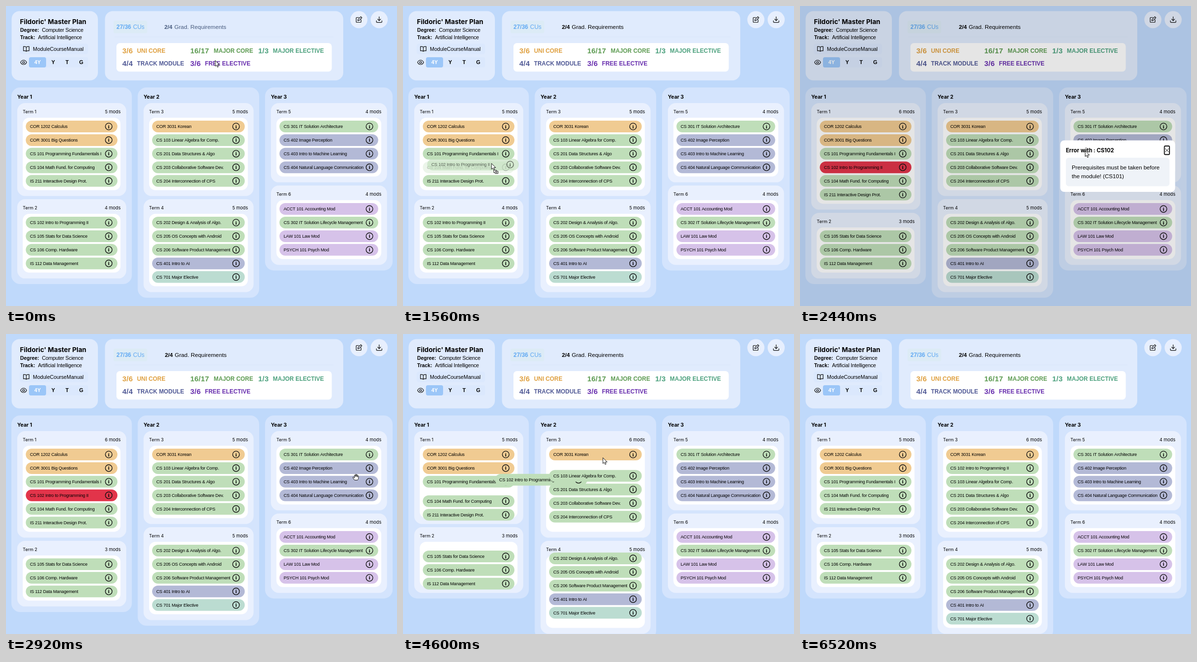
An HTML page with a canvas that plays this animation: 800x615 px, repeating every 6.56 s.

```html
<!DOCTYPE html>
<html lang="en">
<head>
<meta charset="utf-8">
<title>Study planner</title>
<style>
html, body { margin: 0; width: 100%; height: 100%; overflow: hidden; background: #bfd9fb; }
canvas { display: block; }
</style>
</head>
<body>
<canvas id="stage" width="800" height="615"></canvas>
<script>
const g = document.getElementById('stage').getContext('2d');
const LOOP = 6560, SLIDE = 250, PITCH = 27.9;
const DROP1 = 1910, CLOSE = 2820, DROP2 = 4464;
const SANS = '"Liberation Sans", Arial, sans-serif';
const ROUND = 'Inter, sans-serif';
const MOVED = 'CS 102 Intro to Programming II';

const years = [[11, 257.5], [269.5, 518], [530, 791]];
const start = [
  ['COR 1202 Calculus', 'COR 3001 Big Questions', 'CS 101 Programming Fundamentals I',
   'CS 104 Math Fund. for Computing', 'IS 211 Interactive Design Prot.'],
  [MOVED, 'CS 105 Stats for Data Science', 'CS 106 Comp. Hardware', 'IS 112 Data Management'],
  ['COR 3031 Korean', 'CS 103 Linear Algebra for Comp.', 'CS 201 Data Structures & Algo',
   'CS 203 Collaborative Software Dev.', 'CS 204 Interconnection of CPS'],
  ['CS 202 Design & Analysis of Algo.', 'CS 205 OS Concepts with Android',
   'CS 206 Software Product Management', 'CS 401 Intro to AI', 'CS 701 Major Elective'],
  ['CS 301 IT Solution Architecture', 'CS 402 Image Perception',
   'CS 403 Intro to Machine Learning', 'CS 404 Natural Language Communication'],
  ['ACCT 101 Accounting Mod', 'CS 302 IT Solution Lifecycle Management',
   'LAW 101 Law Mod', 'PSYCH 101 Psych Mod']
];

function moveTo(term, index) {
  const lists = start.map(list => list.filter(name => name !== MOVED));
  lists[term].splice(index, 0, MOVED);
  return lists;
}

function layout(lists) {
  const terms = [], rows = new Map(), bottoms = [];
  years.forEach(([left, right], y) => {
    let top = 199;
    for (const i of [2 * y, 2 * y + 1]) {
      const height = 51 + PITCH * lists[i].length;
      terms.push({ i, left, right, top, height, count: lists[i].length });
      lists[i].forEach((name, k) => rows.set(name,
        { x: left + 29.5, y: top + 48 + PITCH * k, w: right - left - 59 }));
      top += height + 6.5;
    }
    bottoms.push(top + 5);
  });
  return { terms, rows, bottoms };
}
const states = [layout(start), layout(moveTo(0, 3)), layout(moveTo(2, 1))];

// time, x, y of the pointer
const path = [[0, 428, 112], [700, 172, 442], [950, 172, 442], [1520, 181, 323], [1600, 181, 323],
  [1800, 181, 312], [2120, 181, 312], [2620, 750, 291], [2840, 750, 291], [3400, 150, 330],
  [3560, 150, 330], [4080, 388, 290], [4360, 409, 254], [5200, 409, 254]];

const smooth = u => { u = Math.max(0, Math.min(1, u)); return u * u * (3 - 2 * u); };
const mix = (a, b, u) => a + (b - a) * u;

function pointer(t) {
  const k = path.findIndex(p => p[0] > t);
  if (k < 1) return null;
  const a = path[k - 1], b = path[k], u = smooth((t - a[0]) / (b[0] - a[0]));
  return { x: mix(a[1], b[1], u), y: mix(a[2], b[2], u) };
}

function box(x, y, w, h, r, fill, stroke, width = 1) {
  g.beginPath();
  g.roundRect(x, y, w, h, r);
  if (fill) { g.fillStyle = fill; g.fill(); }
  if (stroke) { g.strokeStyle = stroke; g.lineWidth = width; g.stroke(); }
}

// y is the middle of the capitals
function text(s, x, y, size, { color = '#000', weight = 400, font = SANS, align = 'left', gap = 0 } = {}) {
  g.font = `${weight} ${size}px ${font}`;
  g.letterSpacing = gap + 'px';
  g.textAlign = align;
  g.fillStyle = color;
  g.fillText(s, x, y + size * 0.36);
}

function shape(d, x, y, { scale = 1, fill, stroke = '#111', width = 1.2 } = {}) {
  const p = new Path2D(d);
  g.save();
  g.translate(x, y);
  g.scale(scale, scale);
  g.lineJoin = g.lineCap = 'round';
  if (fill) { g.fillStyle = fill; g.fill(p); }
  if (stroke) { g.strokeStyle = stroke; g.lineWidth = width; g.stroke(p); }
  g.restore();
}

function disc(x, y, r, fill, stroke, width) {
  g.beginPath();
  g.arc(x, y, r, 0, 7);
  if (fill) { g.fillStyle = fill; g.fill(); }
  if (stroke) { g.strokeStyle = stroke; g.lineWidth = width; g.stroke(); }
}

function rowColor(name) {
  if (name.startsWith('COR')) return '#f0cb92';
  if (name.startsWith('CS 4')) return '#b3b9d6';
  if (name.startsWith('CS 7')) return '#bbdcd1';
  return /^(CS|IS)/.test(name) ? '#bfdeb9' : '#d6c2e9';
}

function drawRow(name, { x, y, w }, red, alpha = 1) {
  g.globalAlpha = alpha;
  box(x, y - 12, w, 24, 12, red ? '#e2344a' : rowColor(name));
  text(name, x + 8.5, y, 9.1, { gap: -0.2 });
  const cx = x + w - 17.8;
  disc(cx, y, 6.9, null, '#111', 1.4);
  text('i', cx, y - 0.2, 10.5, { weight: 700, font: '"Liberation Serif", serif', align: 'center' });
  g.globalAlpha = 1;
}

function drawProfile() {
  box(11.5, 10.5, 176.5, 142, 16, '#e0ebfd');
  text("Fildoric' Master Plan", 28.5, 32, 13.6, { weight: 700, font: ROUND });
  text('Degree:', 29, 49.5, 10.4, { weight: 700 });
  text('Computer Science', 73.5, 49.5, 10.7, { gap: -0.2 });
  text('Track:', 29, 64.5, 10.4, { weight: 700 });
  text('Artificial Intelligence', 65.5, 64.5, 10.7, { gap: -0.2 });
  box(28, 77, 140, 22, 5, '#dbe8fd');
  text('ModuleCourseManual', 55, 88, 10.8, { gap: -0.1 });
  shape('M0-3.6C-1.5-5-4-5-5.8-4.8V3.8C-4 3.6-1.5 3.8 0 5C1.5 3.8 4 3.6 5.8 3.8V-4.8C4-5 1.5-5 0-3.6ZV5', 41.5, 88);
  shape('M-6.2 0C-3.5-6 3.5-6 6.2 0C3.5 6-3.5 6-6.2 0Z', 36, 115.5);
  disc(36, 115.5, 2, null, '#111', 1.2);
  box(47, 105, 121, 21, 4, '#dbe8fd');
  box(47, 105, 35, 21, 4, '#9bc6f8');
  [['4Y', 64.5, '#fff'], ['Y', 96.5], ['T', 125], ['G', 154]].forEach(([s, x, color]) =>
    text(s, x, 115.5, 10.8, { weight: 700, align: 'center', color }));
}

function drawSummary(t) {
  box(202.5, 10.5, 487.5, 142, 16, '#e0ebfd');
  box(220, 30, 69, 26, 4, '#dcebf6');
  text('27/36', 226, 42.5, 12, { weight: 700, color: '#62aaf3' });
  text('CUs', 260, 42.5, 12, { color: '#62aaf3' });
  const u = smooth(t / 240), ink = `rgb(${[70, 90, 125].map(c => Math.round(c * (1 - u)))})`;
  text('2/4', mix(324, 325, u), 42.5, 11.8, { weight: 700, color: ink });
  text('Grad. Requirements', mix(344.5, 345.2, u), 42.5, 11.8, { color: ink });
  box(222, 63, 448, 1, 0, '#dae6fa');
  box(226, 76, 440.5, 58.5, 7, '#fff');
  [['3/6', 'UNI CORE', 238, 268, 91.5, '#dfa040'],
   ['16/17', 'MAJOR CORE', 377, 425, 91.5, '#5d9b52'],
   ['1/3', 'MAJOR ELECTIVE', 516, 546, 91.5, '#4da17e'],
   ['4/4', 'TRACK MODULE', 238, 268, 118, '#515a96'],
   ['3/6', 'FREE ELECTIVE', 377, 407, 118, '#682fae']].forEach(([n, label, x1, x2, y, color]) => {
    text(n, x1, y, 15, { weight: 700, color, gap: 0.2 });
    text(label, x2, y, 11.9, { weight: 700, color });
  });
}

function drawButtons() {
  disc(722, 28, 17.5, '#e7effe');
  disc(763.5, 28, 17.5, '#e7effe');
  shape('M0-4.5H-4.5Q-5.5-4.5-5.5-3.5V4.5Q-5.5 5.5-4.5 5.5H3.5Q4.5 5.5 4.5 4.5V0M-2.2 2.2L-1.6-.6L4-6.1L6.1-4L.6 1.6Z', 722, 28);
  shape('M0-6V2M-3.2-1.2L0 2L3.2-1.2M-5.6 2V4.6Q-5.6 5.6-4.6 5.6H4.6Q5.6 5.6 5.6 4.6V2', 763.5, 28);
}

function drawBoard(view) {
  years.forEach(([left, right], i) => {
    box(left, 167, right - left, view.bottoms[i] - 167, 18, '#d4e4fd');
    text('Year ' + (i + 1), left + 12, 186, 10.5, { weight: 700, font: ROUND });
  });
  for (const { i, left, right, top, height, count } of view.terms) {
    box(left + 12, top, right - left - 23.5, height, 16, '#e9f0fe');
    text('Term ' + (i + 1), left + 23.3, top + 17.5, 9, { font: ROUND });
    text(count + ' mods', right - 23, top + 17.5, 9.2, { font: ROUND, align: 'right' });
    box(left + 23.3, top + 30, right - left - 46.5, height - 42, 13, '#fff');
  }
}

function drawModal() {
  g.fillStyle = 'rgba(0,0,0,.1)';
  g.fillRect(0, 0, 800, 615);
  box(532.5, 275.5, 235, 105.5, 8, '#fff');
  text('Error with : CS102', 544, 295.5, 11.3, { weight: 700, font: ROUND });
  box(745.5, 287, 10.5, 17.5, 2, '#fff', '#111', 1.8);
  shape('M-3.5-3.5L3.5 3.5M3.5-3.5L-3.5 3.5', 750.8, 295.8, { width: 1 });
  box(544, 311, 212, 58.5, 6, '#eff3f8');
  text('Prerequisites must be taken before', 556, 331, 11.6);
  text('the module! (CS101)', 556, 349, 11.6);
}

function drawCursor({ x, y }, kind) {
  if (kind === 'hand') {
    shape('M-3 6L-6 2Q-7 0-5.4-.2L-3 2V-3Q-2.6-5-1.2-3.4V-1V-5Q0-6.8 1-5V-1V-4.4Q2.2-6 3.2-4.2V0V-2.4Q4.6-3.6 5.2-2V2Q5 4.6 3.6 6Z',
      x, y, { fill: '#fff', width: 1 });
    return;
  }
  shape('M0 0V11.5L2.7 9.1L4.6 13.4L6.6 12.5L4.8 8.4H8.3Z', x, y, { fill: '#fff', width: 1 });
  if (kind === 'copy') {
    box(x + 4.5, y + 13.5, 6, 5, 0, '#fff', '#333');
    box(x + 7.5, y + 15.5, 6, 5, 0, '#fff', '#333');
    shape('M-1.5 0H1.5M0-1.5V1.5', x + 10.5, y + 18, { width: 0.8 });
  }
}

function draw(t) {
  const n = t < DROP1 ? 0 : t < DROP2 ? 1 : 2;
  const view = states[n], before = states[Math.max(0, n - 1)];
  const u = n ? smooth((t - (n === 1 ? DROP1 : DROP2)) / SLIDE) : 1;
  const modal = t >= DROP1 && t < CLOSE;
  const drag = t >= 950 && t < 1800 ? { x: 172, y: 442 } : t >= 3560 && t < 4400 ? { x: 150, y: 330 } : null;
  const at = pointer(t);
  const isOver = r => at && at.x > r.x && at.x < r.x + r.w && Math.abs(at.y - r.y) < 12;

  g.fillStyle = '#bfd9fb';
  g.fillRect(0, 0, 800, 615);
  drawProfile();
  drawSummary(t);
  drawButtons();
  drawBoard(view);

  // rows in motion lie above those at rest
  const moving = [];
  let hover = false;
  for (const [name, to] of view.rows) {
    const from = before.rows.get(name);
    const lift = n === 1 && name === MOVED ? 22 : 0;
    if (u < 1 && (Math.abs(from.x - to.x) > 1 || Math.abs(from.y - to.y) > 1)) {
      moving.push([name, { x: mix(from.x, to.x, u), y: mix(from.y + lift, to.y, u), w: mix(from.w, to.w, u) }]);
      continue;
    }
    const over = isOver(to);
    hover ||= over;
    drawRow(name, to, n === 1 && name === MOVED, over && drag && n === 0 && name !== MOVED ? 0.3 : 1);
  }
  for (const [name, r] of moving) drawRow(name, r, n === 1 && name === MOVED);

  if (n === 1 && drag && t > 3900) box(299, 260.3, 190, 1.8, 0, '#4a83c9');
  if (modal) drawModal();
  if (drag) {
    const r = view.rows.get(MOVED);
    drawRow(MOVED, { x: r.x + at.x - drag.x, y: r.y + at.y - drag.y, w: r.w }, n === 1, n ? 0.75 : 0.6);
  }
  if (at) drawCursor(at, drag ? 'copy' : hover && !modal && n < 2 ? 'hand' : 'arrow');
}

const begin = performance.now();
function tick() {
  draw((performance.now() - begin) % LOOP);
  requestAnimationFrame(tick);
}
tick();
</script>
</body>
</html>
```
